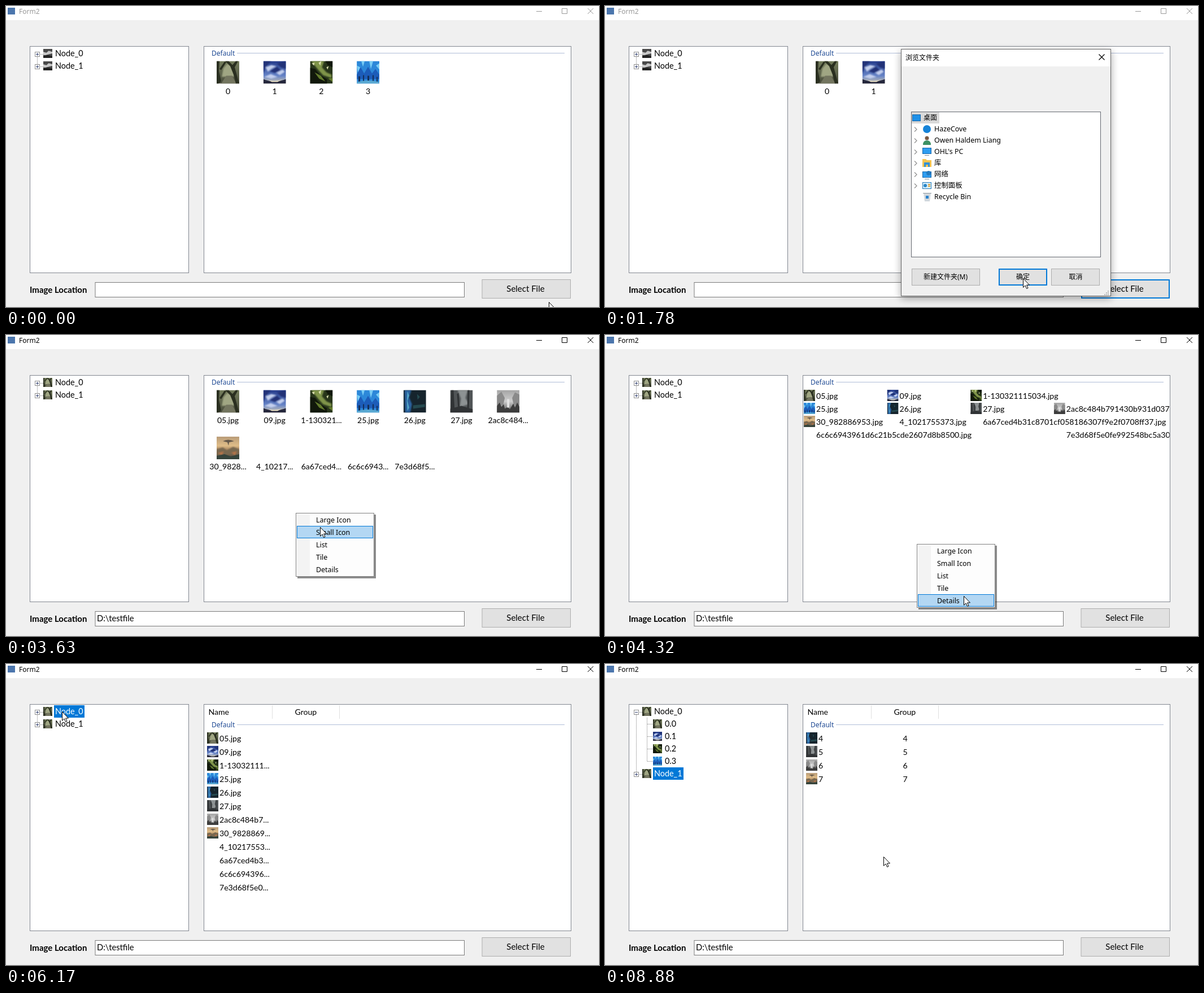
An HTML page that plays this animation: 1050 px wide and 533 px high, repeating every 8.96 s.

```html
<!DOCTYPE html>
<html lang="zh-CN">
<head>
<meta charset="utf-8">
<title>Form2</title>
<style>
  html, body { margin: 0; width: 100%; height: 100%; overflow: hidden; background: #f0f0f0; }
  svg { display: block; }
  text { font: 14.08px Lato, sans-serif; white-space: pre; }
  .ui { font: 12.4px "Noto Sans", "Noto Sans CJK SC", "Noto Sans CJK", sans-serif; }
  .cn { font: 12px "Noto Sans", "Noto Sans CJK SC", "Noto Sans CJK", sans-serif; }
  .group { font: 12px "Noto Sans", sans-serif; fill: #1f4a94; }
  .node { font-size: 14.4px; }
  .field { font-size: 14.7px; }
  .button { font-size: 15px; }
  .label { font: bold 15px Lato, sans-serif; }
  .mid { text-anchor: middle; }
  .white { fill: #fff; }
  .dots { stroke: #808080; stroke-dasharray: 1 1; }
  #dialog { filter: drop-shadow(0 4px 7px rgba(0, 0, 0, .35)); }
  .menu { filter: drop-shadow(3px 3px .6px rgba(0, 0, 0, .45)); }
</style>
</head>
<body>
<svg id="stage" width="1050" height="533" viewBox="0 0 1050 533">
  <defs>
    <clipPath id="listClip"><path d="M351 72H999.5V472H351Z"/></clipPath>
    <filter id="soft"><feGaussianBlur stdDeviation="1"/></filter>
    <linearGradient id="wood" x2="0" y2="1"><stop stop-color="#747d5c"/><stop offset="1" stop-color="#4a4d3d"/></linearGradient>
    <linearGradient id="sky" x2="0" y2="1"><stop stop-color="#263d8c"/><stop offset=".65" stop-color="#6482c6"/><stop offset="1" stop-color="#d8cfb4"/></linearGradient>
    <linearGradient id="dusk" x2="0" y2="1"><stop stop-color="#b99c78"/><stop offset=".4" stop-color="#e0bd88"/><stop offset=".6" stop-color="#a5815c"/><stop offset="1" stop-color="#3c4038"/></linearGradient>
    <linearGradient id="fog" x2="0" y2="1"><stop stop-color="#a4a4a4"/><stop offset=".5" stop-color="#cecece"/><stop offset="1" stop-color="#4a4a4a"/></linearGradient>

    <symbol id="t0" viewBox="0 0 40 40">
      <path fill="url(#wood)" d="M0 0H40V40H0Z"/>
      <path fill="#a0a683" filter="url(#soft)" d="M9 28L12 13 19 5 28 10 32 27Z"/>
      <path fill="#73755f" d="M8 40L17 26H27L35 40Z"/>
      <path fill="#2a2f20" d="M0 0H5L4 18 8 36 3 40H0ZM40 40H34L30 24 24 9 15 0H21L28 7 34 0H38L32 11 36 26ZM5 14L14 1 17 2 8 16Z"/>
    </symbol>
    <symbol id="t1" viewBox="0 0 40 40">
      <path fill="url(#sky)" d="M0 0H40V40H0Z"/>
      <g filter="url(#soft)"><path fill="#203377" d="M0 0H14L5 9 0 22ZM24 4L40 0V14L31 11ZM11 18L24 10 31 16 20 21Z"/>
      <path fill="#c3cfed" d="M4 11L14 7 23 9 14 14 8 19ZM23 21L34 15 38 19 29 25ZM2 28L13 23 25 28 14 31Z"/></g>
      <path fill="#25273c" d="M0 32Q19 40 40 32V40H0Z"/>
      <path fill="#eee4c5" d="M9 34Q22 37 33 33L25 37H15Z"/>
    </symbol>
    <symbol id="t2" viewBox="0 0 40 40">
      <path fill="#27351a" d="M0 0H40V40H0Z"/>
      <path fill="#7f9448" filter="url(#soft)" d="M2 0H25L21 11 29 20 38 24V30L23 25 14 15Z"/>
      <path fill="#dce0b0" d="M15 3L20 0 18 8ZM3 4L8 3 7 8ZM29 11L33 9 31 15Z"/>
      <path fill="#11180b" d="M0 12L9 14 18 25 30 32V40H0ZM27 0H40V11L31 7Z"/>
      <path fill="#627b2c" d="M8 20L19 26 27 36 16 31ZM32 31L40 30V37Z"/>
    </symbol>
    <symbol id="t3" viewBox="0 0 40 40">
      <path fill="#2c88d9" d="M0 0H40V40H0Z"/>
      <path fill="#79cdf5" d="M8 0H14L11 10ZM22 0H29L25 14ZM0 8L6 11 2 20ZM34 8L40 4V15Z"/>
      <path fill="#1c5cb9" d="M0 24L7 11 13 22 20 10 27 22 33 14 40 24V32H0Z"/>
      <path fill="#122e58" d="M3 27H6V38H3ZM11 25H13V37H11ZM19 26H22V38H19ZM28 25H30V37H28ZM35 28H37V38H35Z"/>
      <path fill="#5aa9d2" d="M0 37Q20 32 40 37V40H0Z"/>
    </symbol>
    <symbol id="t4" viewBox="0 0 40 40">
      <path fill="#16242d" d="M0 0H40V40H0Z"/>
      <path fill="#2a629f" filter="url(#soft)" d="M2 0H14L10 13 15 25 12 40H3Z"/>
      <path fill="#55a9c9" d="M7 2L10 10 7 19 10 31 7 37 6 20Z"/>
      <path fill="#254a50" d="M17 27L38 25V30L17 33ZM24 7L29 12 25 17Z"/>
    </symbol>
    <symbol id="t5" viewBox="0 0 40 40">
      <path fill="#505456" d="M0 0H40V40H0Z"/>
      <path fill="#8d9293" filter="url(#soft)" d="M13 0H31L27 14 33 25 17 30 19 15Z"/>
      <path fill="#303335" d="M2 0H6L8 38H1ZM12 7L15 5 17 33H14ZM31 0H34L33 39H30ZM0 33L20 28 40 34V40H0Z"/>
    </symbol>
    <symbol id="t6" viewBox="0 0 40 40">
      <path fill="url(#fog)" d="M0 0H40V40H0Z"/>
      <path fill="#8a8a8a" d="M0 10L8 3 14 14 11 27H0ZM40 8L32 4 27 14 30 27H40Z"/>
      <path fill="#3d3d3d" d="M0 28L5 22 8 30 12 25 14 33 19 30 23 34 29 24 32 31 36 22 40 30V40H0Z"/>
      <path fill="#e4e4e4" d="M18 16H22V31H18Z"/>
    </symbol>
    <symbol id="t7" viewBox="0 0 40 40">
      <path fill="url(#dusk)" d="M0 0H40V40H0Z"/>
      <path fill="#65584a" d="M11 8Q20 3 31 8L22 10 21 16 19 10Z"/>
      <path fill="#786850" filter="url(#soft)" d="M0 22L11 19 18 24 29 18 40 22V31H0Z"/>
      <path fill="#b77448" filter="url(#soft)" d="M2 29L13 26 9 33ZM26 28L36 26 32 33Z"/>
      <path fill="#36443c" d="M0 34L14 31 25 35 40 31V40H0Z"/>
    </symbol>
    <symbol id="t8" viewBox="0 0 40 40">
      <path fill="#4a4a4a" d="M0 0H40V40H0Z"/>
      <path fill="#c8c8c8" filter="url(#soft)" d="M0 13L14 17 24 8 40 13V20L24 24 11 29 0 27Z"/>
      <path fill="#222" d="M0 30L17 26 40 32V40H0Z"/>
    </symbol>
  </defs>
</svg>
<script>
const LOOP = 8960, CLICK = 470, OPEN = 620, CLOSE = 1850, LOAD = 1930;
const SMALL = 3940, DETAILS = 4780, EXPAND = 6800, CHILD = 7180, PARENT = 7800, LAST = 8570;

// Cursor stops: time, x, y
const stops = [
  [60, 961, 524], [140, 936, 505], [660, 936, 505], [940, 221, 196], [1020, 232, 200],
  [1320, 598, 268], [1380, 598, 268], [1550, 856, 441], [1660, 856, 441], [1780, 740, 482],
  [1860, 740, 482], [2300, 424, 187], [2900, 424, 187], [3090, 513, 315], [3500, 513, 315],
  [3630, 556, 340], [3780, 556, 340], [3860, 565, 350], [3940, 565, 350], [4060, 552, 370],
  [4320, 635, 462], [4400, 635, 462], [4630, 640, 477], [4800, 640, 477], [5620, 52, 84],
  [5740, 52, 84], [5860, 99, 84], [6200, 99, 84], [6400, 65, 87], [6520, 65, 87],
  [6570, 58, 86], [6760, 58, 86], [6950, 112, 108], [7160, 112, 108], [7240, 114, 110],
  [7660, 114, 110], [7790, 98, 83], [7860, 98, 83], [8100, 110, 182], [8220, 110, 182],
  [8270, 110, 186], [8380, 110, 186], [8420, 110, 194], [8560, 110, 194], [8870, 493, 341]
];

const files = ["05.jpg", "09.jpg", "1-130321115034.jpg", "25.jpg", "26.jpg", "27.jpg",
  "2ac8c484b791430b931d0373.jpg", "30_982886953.jpg", "4_1021755373.jpg",
  "6a67ced4b31c8701cf058186307f9e2f0708ff37.jpg", "6c6c6943961d6c21b5cde2607d8b8500.jpg",
  "7e3d68f5e0fe992548bc5a301.jpg"];
const smallCells = [0, 1, 2, 4, 5, 6, 7, 8, 9, 10, 12, 15];

const text = (x, y, s, cls = "") => `<text x="${x}" y="${y}" class="${cls}">${s}</text>`;
const rect = (x, y, w, h, fill, stroke = "none", sw = 1) =>
  `<rect x="${x}" y="${y}" width="${w}" height="${h}" fill="${fill}" stroke="${stroke}" stroke-width="${sw}"/>`;
const line = (d, stroke, w = 1) => `<path d="${d}" fill="none" stroke="${stroke}" stroke-width="${w}"/>`;
const fill = (d, color) => `<path d="${d}" fill="${color}"/>`;
const thumb = (i, x, y, size) => i > 8 ? "" : `<use href="#t${i}" x="${x}" y="${y}" width="${size}" height="${size}"/>`;
const show = (on, ...parts) => `<g data-on="${on}">${parts.join("")}</g>`;
const cut = (s, n) => s.length > 10 ? s.slice(0, n) + "..." : s;
const photo = i => i < 8 ? i : 9;

// Main window
const caption = color => `<g fill="${color}">${text(23, 14, "Form2", "cn")}</g>` +
  line("M939 9.5H949M984.5 4.5H993.5V13.5H984.5ZM1030 4L1040 14M1040 4L1030 14", color);

const pushButton = (x, y, w, h, focus) => focus
  ? rect(x + .5, y + .5, w - 1, h - 1, "#e1e1e1", "#0078d7", 2)
  : rect(x, y, w, h, "#e1e1e1", "#adadad");

const frame = () => rect(0, 0, 1050, 25, "#fff") + rect(3, 3, 13, 12, "#4c76ad") +
  show(`0-${CLICK},${OPEN}-${CLOSE}`, caption("#999")) +
  show(`${CLICK}-${OPEN},${CLOSE}-${LOOP}`, caption("#000")) +
  rect(42.5, 71.5, 281, 401, "#fff", "#828790") +
  rect(350.5, 71.5, 650, 401, "#fff", "#828790") +
  text(42, 508, "Image Location", "label") +
  rect(158, 489.5, 653.5, 26, "#fff", "#7a7a7a") +
  show(`${LOAD}-${LOOP}`, text(161, 507, "D:\\testfile", "field")) +
  show(`0-70,3470-${LOOP}`, pushButton(843, 484.5, 156.5, 33)) +
  show(`70-${CLICK}`, rect(843.5, 484.5, 156, 33, "#e5f1fb", "#0078d7")) +
  show(`${CLICK}-3470`, pushButton(843.5, 484.5, 156, 33, true)) +
  text(920, 506, "Select File", "button mid");

// Left tree
const rowY = row => 84 + 22 * row;
const nodeText = (x, row, s, cls = "") => text(x, rowY(row) + 5, s, "node " + cls);
const marker = (row, open) => {
  const y = rowY(row) + 1.5;
  return rect(51.5, y - 4, 8, 8, "#fff", "#919191") +
    line(`M53 ${y}H58` + (open ? "" : `M55.5 ${y - 2.5}V${y + 2.5}`), "#3c4a78") +
    `<path class="dots" d="M61 ${y}H66"/>`;
};
const root = (row, s) => nodeText(87, row, s) +
  show(`0-${LOAD}`, thumb(8, 66, rowY(row) - 8, 16)) +
  show(`${LOAD}-${LOOP}`, thumb(0, 66, rowY(row) - 8, 16));
const child = i => `<path class="dots" d="M75 ${rowY(i + 1) + .5}H85"/>` +
  thumb(i, 85, rowY(i + 1) - 8, 16) + nodeText(106, i + 1, "0." + i);
const selected = (on, x, row, w, s) =>
  show(on, rect(x, rowY(row) - 11, w, 22, "#0078d7"), nodeText(x + 2, row, s, "white"));

const tree = () => root(0, "Node_0") +
  show(`0-${EXPAND}`, `<path class="dots" d="M55.5 90V103"/>`, marker(0), root(1, "Node_1"), marker(1)) +
  show(`${EXPAND}-${LOOP}`, `<path class="dots" d="M55.5 90V191M74.5 95V173"/>`, marker(0, true),
    [0, 1, 2, 3].map(child).join(""), root(5, "Node_1"), marker(5)) +
  selected(`5870-${CHILD},${PARENT}-${LAST}`, 85, 0, 54, "Node_0") +
  selected(`${CHILD}-${PARENT}`, 104, 1, 24, "0.0") +
  selected(`${LAST}-${LOOP}`, 85, 5, 54, "Node_1");

// Right list
const groupBar = y => text(364, y + 5, "Default", "group") + line(`M409 ${y + .5}H989`, "#b0bdd8");
const largeView = names => groupBar(83) + names.map((s, i) => {
  const x = 393 + 82.7 * (i % 7), y = 97.5 + 82.5 * Math.floor(i / 7);
  return thumb(photo(i), x - 20, y, 40) + text(x, y + 58, cut(s, s.includes("_") ? 7 : 8), "mid");
}).join("");
const smallView = () => groupBar(83) + files.map((s, i) => {
  const x = 352 + 147.6 * (smallCells[i] % 4), y = 97 + 23 * Math.floor(smallCells[i] / 4);
  return thumb(photo(i), x, y, 20) + text(x + 22, y + 16, s);
}).join("");
const detailRows = (names, first = 0, grouped = false) => groupBar(107) + names.map((s, i) => {
  const y = 121 + 24 * i;
  return thumb(photo(i + first), 356, y, 20) + text(378, y + 16, cut(s, 10)) +
    (grouped ? text(527.5, y + 16, s) : "");
}).join("");
const numbers = from => [0, 1, 2, 3].map(i => String(from + i));

const list = () => `<g clip-path="url(#listClip)">` +
  show(`0-${LOAD}`, largeView(numbers(0))) +
  show(`${LOAD}-${SMALL}`, largeView(files)) +
  show(`${SMALL}-${DETAILS}`, smallView()) +
  show(`${DETAILS}-${LOOP}`, text(358.5, 90, "Name"), text(511.5, 90, "Group"),
    line("M471.5 73V97M590.5 73V97", "#e0e0e0")) +
  show(`${DETAILS}-${CHILD}`, detailRows(files)) +
  show(`${PARENT}-8650`, detailRows(numbers(0), 0, true)) +
  show(`8650-${LOOP}`, detailRows(numbers(4), 4, true)) + "</g>";

// Folder dialog
const screen = (x, y) => rect(x + .5, y + .5, 15, 10, "#2f9df0", "#1767ad") + fill(`M${x + 4} ${y + 13}h8v1h-8Z`, "#7f8c99");
const folderIcons = [
  `<circle cx="570" cy="218" r="7" fill="#1683d8"/>`,
  `<circle cx="570" cy="234" r="3.5" fill="#7b5b45"/>` + fill("M563 246Q563 238 570 238T577 246Z", "#3d9163"),
  screen(562, 251),
  fill("M562 271H568L570 273H578V285H562Z", "#f5c451") + fill("M565 277H575V285H572V281H568V285H565Z", "#3290d6"),
  screen(562, 293) + `<circle cx="573" cy="296" r="4" fill="#2479bd"/>`,
  rect(562.5, 312.5, 15, 11, "#d8effc", "#1f78b8") + `<circle cx="567" cy="318" r="3" fill="#2886c8"/>` +
    line("M572 316H576M572 319H576", "#e0a030", 2),
  fill("M564 331H577L575 346H566Z", "#d2d8dd") + line("M563 331.5H578", "#8e979e") + rect(568, 336, 5, 5, "#2a82cc")
];
const folders = ["HazeCove", "Owen Haldem Liang", "OHL's PC", "库", "网络", "控制面板", "Recycle Bin"];
const grip = [[0, 2], [1, 1], [1, 2], [2, 0], [2, 1], [2, 2]];

const dialog = () => show(`${OPEN}-${CLOSE}`, `<g id="dialog">`,
  rect(524.5, 76.5, 371, 437, "#f0f0f0", "#666"), rect(525, 77, 370, 30, "#fff"), "</g>",
  text(532, 96, "浏览文件夹", "cn"), line("M874.5 85.5L884.5 95.5M884.5 85.5L874.5 95.5", "#000", 1.2),
  rect(542.5, 187.5, 335, 257, "#fff", "#646870"),
  rect(543, 188, 49, 20, "#d9d9d9"), rect(544.5, 192.5, 14, 11, "#1e90e8", "#1464a8"), text(564, 202, "桌面", "cn"),
  folders.map((s, i) => folderIcons[i] + text(583, 222 + 20 * i, s, "ui") +
    (i < 6 ? line(`M548 ${214.5 + 20 * i}l4 4l-4 4`, "#8c8c8c", 1.2) : "")).join(""),
  pushButton(543.5, 465.5, 120, 29), text(603, 484, "新建文件夹(M)", "cn mid"),
  pushButton(697.5, 465.5, 85, 29, true), text(740, 484, "确定", "cn mid"),
  pushButton(790.5, 465.5, 85, 29), text(833.5, 484, "取消", "cn mid"),
  grip.map(([x, y]) => rect(884 + 3 * x, 504 + 3 * y, 2, 2, "#b8b8b8")).join(""));

// Context menu, drawn around its own corner
const menuItems = ["Large Icon", "Small Icon", "List", "Tile", "Details"];
const menu = (from, to, x, y) => show(`${from}-${to}`, `<g transform="translate(${x} ${y})">`,
  `<g class="menu">${rect(.5, .5, 138, 112, "#fdfdfd", "#808080")}</g>`, rect(2, 2, 23, 109, "#f3f3f3"),
  `<rect class="hover" data-x="${x}" data-y="${y}" x="2.5" width="134" height="21" fill="#b3d7f3" stroke="#0078d7"/>`,
  menuItems.map((s, i) => text(36, 17 + 22 * i, s, "ui")).join(""), "</g>");

const arrow = `<path id="cursor" d="M.5 .5V16.3L4.1 12.9 6.6 18.5 9 17.4 6.6 12H11.5Z" fill="#fff" stroke="#000"/>`;

const stage = document.getElementById("stage");
stage.insertAdjacentHTML("beforeend", frame() + tree() + list() +
  menu(3470, SMALL, 513, 315) + menu(4080, DETAILS, 552, 370) + dialog() + arrow);

const cursor = document.getElementById("cursor");
const hovers = [...stage.querySelectorAll(".hover")];
const timed = [...stage.querySelectorAll("[data-on]")].map(el => ({
  el, spans: el.dataset.on.split(",").map(s => s.split("-").map(Number))
}));

function cursorAt(t) {
  const n = stops.findIndex(s => s[0] > t);
  if (n < 1) return (n ? stops[stops.length - 1] : stops[0]).slice(1);
  const a = stops[n - 1], b = stops[n];
  const u = (t - a[0]) / (b[0] - a[0]), k = u * u * (3 - 2 * u);
  return [a[1] + (b[1] - a[1]) * k, a[2] + (b[2] - a[2]) * k];
}

function draw() {
  const t = performance.now() % LOOP;
  for (const { el, spans } of timed)
    el.style.display = spans.some(([a, b]) => t >= a && t < b) ? "" : "none";
  const [x, y] = cursorAt(t).map(Math.round);
  cursor.setAttribute("transform", `translate(${x} ${y})`);
  for (const el of hovers) {
    const dx = x - el.dataset.x, dy = y - el.dataset.y;
    el.style.display = dx > 1 && dx < 138 && dy > 1 && dy < 112 ? "" : "none";
    el.setAttribute("y", 1.5 + 22 * Math.floor((dy - 1) / 22));
  }
  requestAnimationFrame(draw);
}
draw();
</script>
</body>
</html>
```
